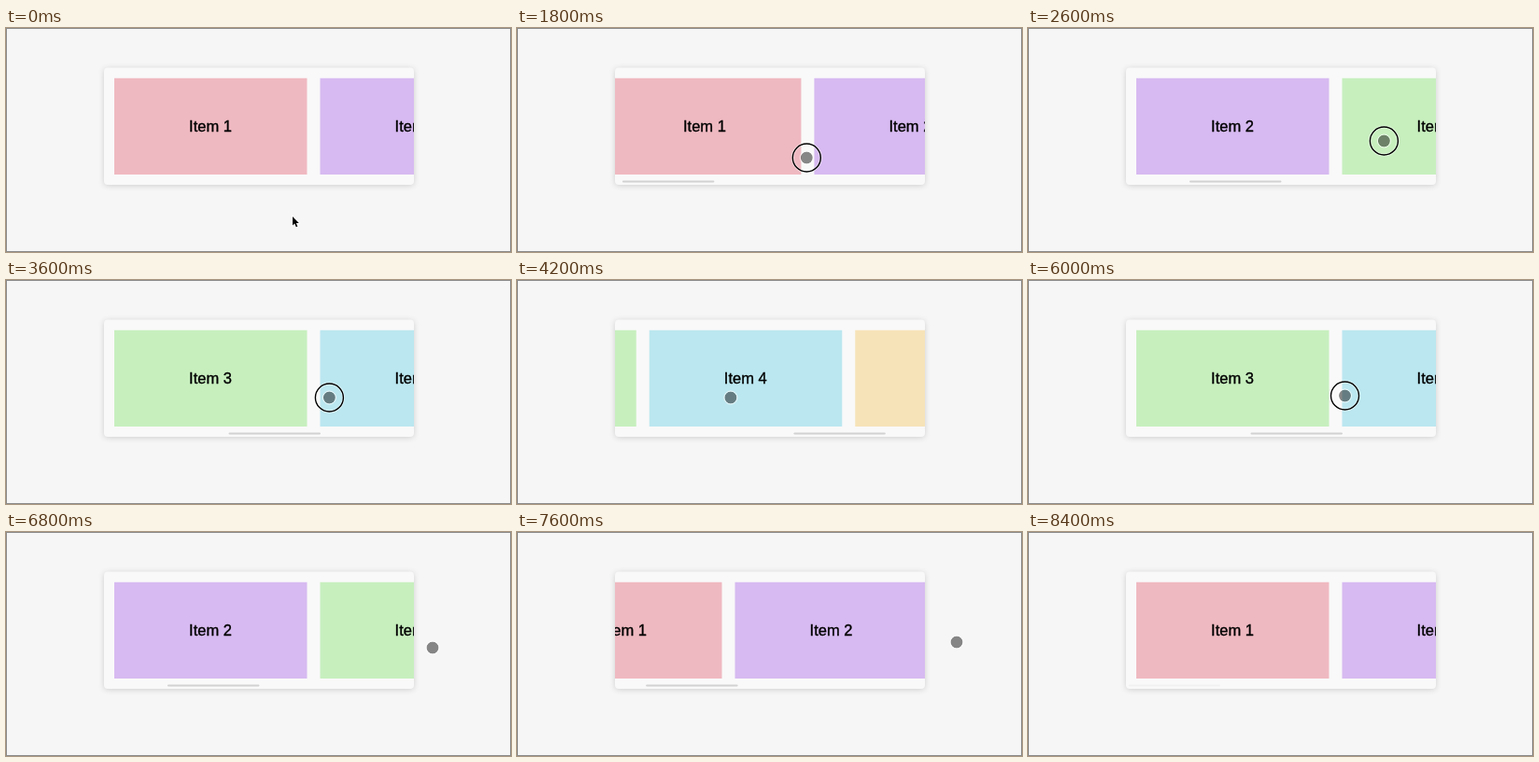
An HTML page with a canvas that plays this animation: 541 px wide and 240 px high, repeating every 8800 ms.

```html
<!DOCTYPE html>
<html lang="en">
<head>
<meta charset="utf-8">
<title>Scroll snap carousel</title>
<style>
  html, body { margin: 0; width: 100%; height: 100%; overflow: hidden; background: #f6f6f6; }
  canvas { display: block; }
</style>
</head>
<body>
<canvas id="stage" width="541" height="240"></canvas>
<script>
const ctx = document.getElementById('stage').getContext('2d');
const LOOP = 8800, STEP = 200, HOLD = 400, SNAP = 400;
const PITCH = 220.5, REACH = 117.5;
const COLORS = ['#efb9c1', '#d7baf1', '#c7efbe', '#bbe7f0', '#f6e3b8'];
const START = { x: 307, y: 202 };

// Three swipes forward, then three back: press time and point
const SWIPES = [
  [1600, 328.4, 139], [2600, 381.4, 121], [3600, 346.4, 126],
  [4800, 263, 132.3], [6000, 339.5, 124], [7200, 353.5, 118]
].map(([press, x, y], i) => {
  const dir = i < 3 ? 1 : -1;
  const from = i < 3 ? i : 6 - i;
  return { press, x, y, dir, from, to: from + dir };
});

const clamp = k => Math.max(0, Math.min(1, k));
const mix = (a, b, k) => a + (b - a) * k;
const smooth = k => k * k * (3 - 2 * k);

const swipeAt = t => SWIPES.findLastIndex(s => t >= s.press);
const pulled = (s, t) => REACH * clamp((t - s.press) / HOLD) ** 2.7;

// Drag, rest while the cards snap, then glide to the next press point
function pointer(t) {
  const i = swipeAt(t), s = SWIPES[i], next = SWIPES[i + 1];
  const here = s ? { x: s.x - s.dir * pulled(s, t), y: s.y } : START;
  if (!next) return here;
  const leave = s ? s.press + HOLD + SNAP : 800;
  const k = smooth(clamp((t - leave) / (next.press - leave)));
  return { x: mix(here.x, next.x, k), y: mix(here.y, next.y, k) };
}

function scrollAt(t) {
  const s = SWIPES[swipeAt(t)];
  if (!s) return 0;
  const held = s.from * PITCH + s.dir * pulled(s, t);
  const rest = 1 - clamp((t - s.press - HOLD) / SNAP);
  return mix(s.to * PITCH, held, rest * rest);
}

function box(x, y, w, h, r, fill) {
  ctx.beginPath();
  ctx.roundRect(x, y, w, h, r);
  ctx.fillStyle = fill;
  ctx.fill();
}

function disc(x, y, r, fill) {
  ctx.beginPath();
  ctx.arc(x, y, r, 0, Math.PI * 2);
  ctx.fillStyle = fill;
  ctx.fill();
}

function ring(x, y, r, stroke, width) {
  ctx.beginPath();
  ctx.arc(x, y, r, 0, Math.PI * 2);
  ctx.strokeStyle = stroke;
  ctx.lineWidth = width;
  ctx.stroke();
}

function drawCarousel(t) {
  const scroll = scrollAt(t);
  ctx.save();
  ctx.shadowColor = 'rgba(0,0,0,.16)';
  ctx.shadowBlur = 6;
  ctx.shadowOffsetY = 1;
  box(105, 42.5, 332, 125.5, 4, '#f9f9f9');
  ctx.restore();

  ctx.save();
  ctx.beginPath();
  ctx.roundRect(105, 42.5, 332, 125.5, 4);
  ctx.clip();
  ctx.font = '16.5px "Liberation Sans", Arial, sans-serif';
  ctx.textAlign = 'center';
  ctx.strokeStyle = '#000';
  ctx.lineWidth = .35;
  COLORS.forEach((color, i) => {
    const x = 116 + i * PITCH - scroll, label = 'Item ' + (i + 1);
    box(x, 53.8, 206.5, 103.2, 0, color);
    ctx.fillStyle = '#000';
    ctx.fillText(label, x + 103, 111);
    ctx.strokeText(label, x + 103, 111);
  });
  if (t > SWIPES[0].press) {
    ctx.globalAlpha = 1 - .8 * clamp((t - 8000) / 400);
    box(107.5 + scroll * .297, 163.4, 98.5, 2.1, 1, '#d2d2d2');
  }
  ctx.restore();
}

function drawPointer(t) {
  const { x, y } = pointer(t);
  if (t < 1400) {
    ctx.save();
    ctx.translate(x, y);
    const arrow = new Path2D('M0 0V9.6L2.2 7.6L3.8 11.2L5.4 10.5L3.8 7H6.8Z');
    ctx.lineWidth = 1.6;
    ctx.strokeStyle = '#fff';
    ctx.stroke(arrow);
    ctx.fillStyle = '#000';
    ctx.fill(arrow);
    ctx.restore();
  } else if (t < 8200) {
    disc(x, y, 6.5, 'rgba(0,0,0,.46)');
    ring(x, y, 7, 'rgba(255,255,255,.7)', 1);
    if (SWIPES.some(s => t >= s.press && t < s.press + HOLD)) {
      ring(x, y, 15, 'rgba(255,255,255,.5)', 3);
      ring(x, y, 15, '#000', 1.4);
    }
  }
}

function frame(now) {
  const t = Math.floor(now % LOOP / STEP) * STEP;
  ctx.fillStyle = '#f6f6f6';
  ctx.fillRect(0, 0, 541, 240);
  drawCarousel(t);
  drawPointer(t);
  ctx.strokeStyle = '#8c8c8c';
  ctx.lineWidth = 1;
  ctx.strokeRect(.5, .5, 540, 239);
  requestAnimationFrame(frame);
}
requestAnimationFrame(frame);
</script>
</body>
</html>
```
